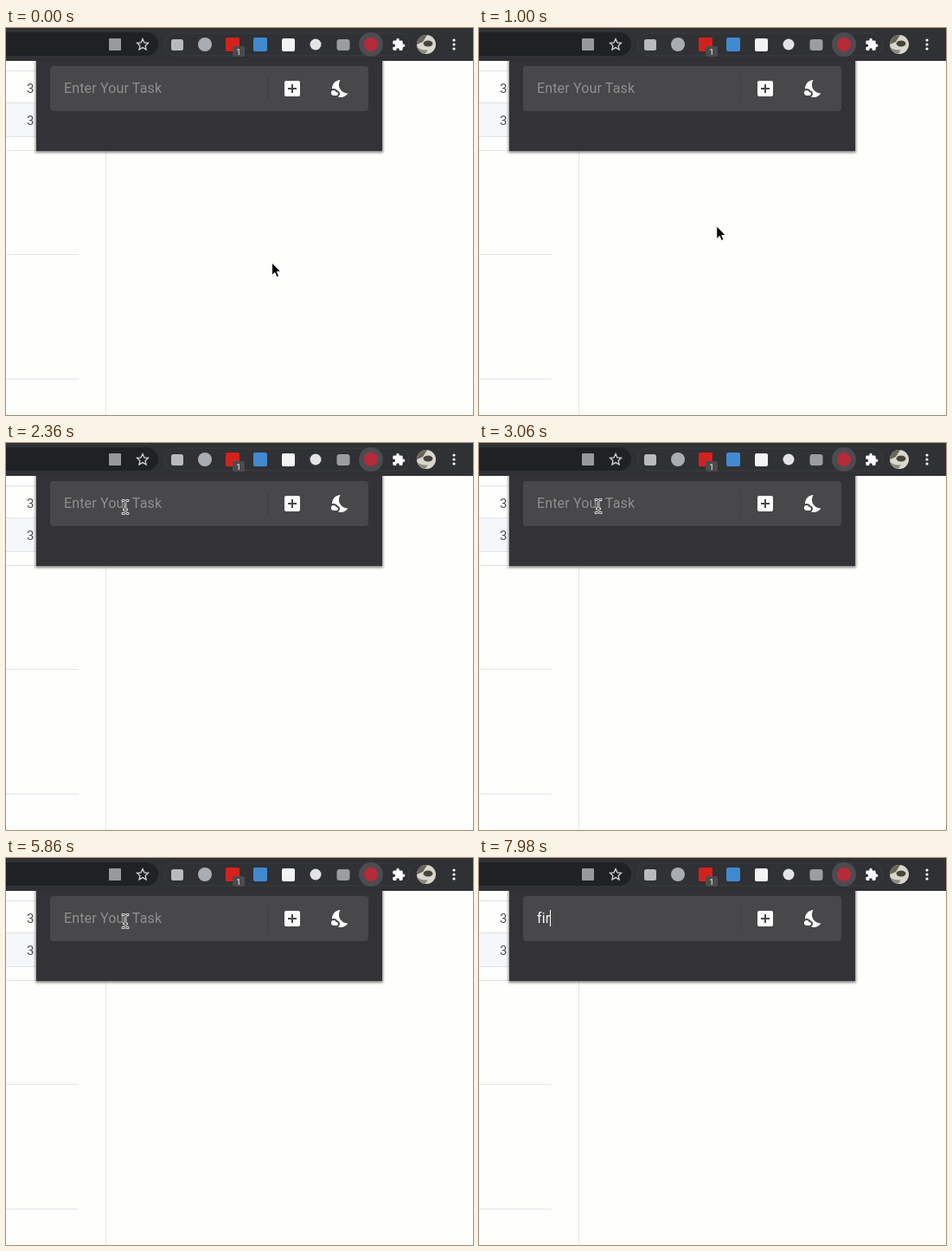
An HTML page for the animation above (8 s loop, 540x447 px).

```html
<!DOCTYPE html>
<html lang="en">
<head>
<meta charset="utf-8">
<title>Task popup</title>
<style>
  html, body { margin: 0; width: 100%; height: 100%; overflow: hidden; background: #fefefc; }
  svg { display: block; width: 100%; height: 100%; }
  text { font-family: Roboto, Arial, sans-serif; }
  .field { font-size: 16px; letter-spacing: .15px; }
</style>
</head>
<body>
<svg viewBox="0 0 540 447">
  <defs>
    <filter id="soft" x="-5%" y="-15%" width="110%" height="130%"><feGaussianBlur stdDeviation="1.6"/></filter>
    <clipPath id="face"><circle cx="486" cy="19" r="11"/></clipPath>
    <path id="stem" d="M-3-7.5H-1.5L0-6.5 1.5-7.5H3M0-6.5V6.5M-3 7.5H-1.5L0 6.5 1.5 7.5H3M-1.5 3H1.5"/>
  </defs>

  <!-- page -->
  <rect width="540" height="447" fill="#fefefc"/>
  <rect y="86" width="36" height="39" fill="#f5f7fa"/>
  <path d="M0 49.5H36M0 86.5H36M0 125.5H36M0 141.5H36" stroke="#e2e3e6"/>
  <path d="M0 261.5H84M0 405.5H84M115.5 142V447" stroke="#e6e6ea"/>
  <g font-size="15" fill="#505054">
    <text x="24" y="74.5">3</text>
    <text x="24" y="111.5">3</text>
  </g>

  <!-- popup -->
  <rect x="34" y="36" width="402" height="108" fill="#333" opacity=".6" filter="url(#soft)"/>
  <rect x="35" y="36" width="400" height="106" fill="#333337"/>
  <rect x="51" y="44" width="368" height="52" rx="4" fill="#48484a"/>
  <path d="M302.5 56V84" stroke="#3f3f42"/>
  <text id="hint" class="field" x="67" y="75" fill="#8f8f90">Enter Your Task</text>
  <text id="typed" class="field" x="67" y="75" fill="#fff"></text>
  <rect id="caret" x="67" y="60" width="1" height="19" fill="#fff"/>
  <g fill="#fff">
    <path transform="translate(319 58)" d="M19 3H5a2 2 0 0 0-2 2v14a2 2 0 0 0 2 2h14a2 2 0 0 0 2-2V5a2 2 0 0 0-2-2zM17 13h-4v4h-2v-4H7v-2h4V7h2v4h4z"/>
    <path transform="translate(375 58)" d="M11.1 12.1C8.8 7.6 10.6 3.6 11.6 2 6.3 2.2 2 6.6 2 12v.4c.6-.3 1.3-.4 2-.4 1.7 0 3.2.8 4.1 2.15A4 4 0 0 1 11 18c0 1.5-.9 2.8-2.1 3.5 1 .3 2 .5 3.1.5 3.5 0 6.6-1.8 8.4-4.5-2.4.2-7-1-9.3-5.4zM7 16h-.2A3 3 0 1 0 4 20h3a2 2 0 0 0 0-4z"/>
  </g>

  <!-- toolbar -->
  <rect width="540" height="38" fill="#303135"/>
  <path d="M0 5H162.5a13.5 13.5 0 0 1 0 27H0z" fill="#202124"/>
  <rect x="183.5" y="6" width="283" height="26" rx="13" fill="none" stroke="#3b3c40"/>
  <rect x="119" y="12" width="14" height="14" rx="1" fill="#98999c"/>
  <path d="M158 12.6l1.9 4.2 4.6.5-3.4 3.1 1 4.5-4.1-2.3-4.1 2.3 1-4.5-3.4-3.1 4.6-.5z" fill="none" stroke="#cfd0d2" stroke-width="1.3"/>
  <rect x="191" y="13" width="14" height="13" rx="2.5" fill="#b9babb"/>
  <circle cx="230" cy="19" r="8" fill="#a7adb2"/>
  <rect x="254" y="11" width="16" height="16" rx="1.5" fill="#d3221c"/>
  <rect x="262" y="21" width="14" height="12" rx="2" fill="#4b4b4e"/>
  <text x="269" y="30.5" font-size="9.5" fill="#fff" text-anchor="middle">1</text>
  <rect x="286" y="11" width="16" height="16" rx="2" fill="#4189d0"/>
  <rect x="319" y="12" width="15" height="15" rx="2" fill="#f3f3f3"/>
  <circle cx="358" cy="19" r="6.5" fill="#e4e4e5"/>
  <rect x="382.5" y="13" width="15" height="13" rx="3" fill="#9c9d9f"/>
  <circle cx="422" cy="19" r="14" fill="#4c4c50"/>
  <circle cx="422" cy="19" r="8" fill="#b72a38"/>
  <path transform="translate(446 11.2) scale(.67)" fill="#fff" d="M20.5 11H19V7a2 2 0 0 0-2-2h-4V3.5a2.5 2.5 0 0 0-5 0V5H4a2 2 0 0 0-2 2v3.8h1.5a2.7 2.7 0 0 1 0 5.4H2V20a2 2 0 0 0 2 2h3.8v-1.5a2.7 2.7 0 0 1 5.4 0V22H17a2 2 0 0 0 2-2v-4h1.5a2.5 2.5 0 0 0 0-5z"/>
  <g clip-path="url(#face)">
    <rect x="475" y="8" width="22" height="22" fill="#d9d7cb"/>
    <path d="M475 8h12l-5 8-7 3z" fill="#696658"/>
    <ellipse cx="488" cy="18" rx="5.5" ry="3.5" fill="#46443d"/>
    <path d="M475 22q7 5 13 3l-4 6h-9z" fill="#8b887c"/>
  </g>
  <g fill="#fff">
    <circle cx="518" cy="14" r="1.6"/><circle cx="518" cy="19" r="1.6"/><circle cx="518" cy="24" r="1.6"/>
  </g>

  <!-- pointer -->
  <path id="arrow" d="M0 0V14.8L3.4 11.6 5.6 16.7 8.1 15.6 6 10.6H10.4Z" fill="#000" stroke="#fff" stroke-linejoin="round"/>
  <g id="beam" fill="none" stroke-linecap="square">
    <use href="#stem" stroke="#fff" stroke-width="2.6"/>
    <use href="#stem" stroke="#1c1c1e" stroke-width=".9"/>
  </g>
</svg>
<script>
const LOOP = 8000;
const $ = id => document.getElementById(id);
const [hint, typed, caret, arrow, beam] = ['hint', 'typed', 'caret', 'arrow', 'beam'].map($);

// time, x, y of the pointer: one sweep up into the field, then a tiny nudge
const path = [[780, 307.5, 271], [1380, 165, 92], [1570, 138, 74], [2500, 138, 74], [2700, 138, 73]];
const click = 3880, blink = 1000;
const keys = [[6250, 'f'], [6800, 'i'], [7350, 'r']];

const show = (el, on) => el.setAttribute('visibility', on ? 'visible' : 'hidden');

// Speed of one axis at a point; the pointer rests at every point but the one it sweeps through.
function speed(i, axis) {
  if (i !== 1) return 0;
  return (path[2][axis] - path[0][axis]) / (path[2][0] - path[0][0]);
}

function pointerAt(t) {
  const i = path.findIndex(p => t < p[0]);
  if (i === 0) return path[0].slice(1);
  if (i < 0) return path[path.length - 1].slice(1);
  const a = path[i - 1], b = path[i], d = b[0] - a[0];
  const u = (t - a[0]) / d, v = 1 - u;
  return [1, 2].map(k =>
    v * v * (1 + 2 * u) * a[k] + u * u * (1 + 2 * v) * b[k] +
    d * u * v * (v * speed(i - 1, k) - u * speed(i, k)));
}

function draw(t) {
  const pressed = keys.filter(k => t >= k[0]);
  const word = pressed.map(k => k[1]).join('');
  const since = word ? pressed[pressed.length - 1][0] : click;

  typed.textContent = word;
  show(hint, !word);
  caret.setAttribute('x', 67 + (word ? Math.round(typed.getComputedTextLength()) : 0));
  show(caret, t >= click && Math.floor((t - since) / blink) % 2 === 0);

  const [x, y] = pointerAt(t);
  const overField = y < 90;
  for (const el of [arrow, beam]) el.setAttribute('transform', `translate(${x} ${y})`);
  show(arrow, !overField);
  show(beam, overField && !word);
}

const start = performance.now();
function tick() {
  draw((performance.now() - start) % LOOP);
  requestAnimationFrame(tick);
}
tick();
</script>
</body>
</html>
```
